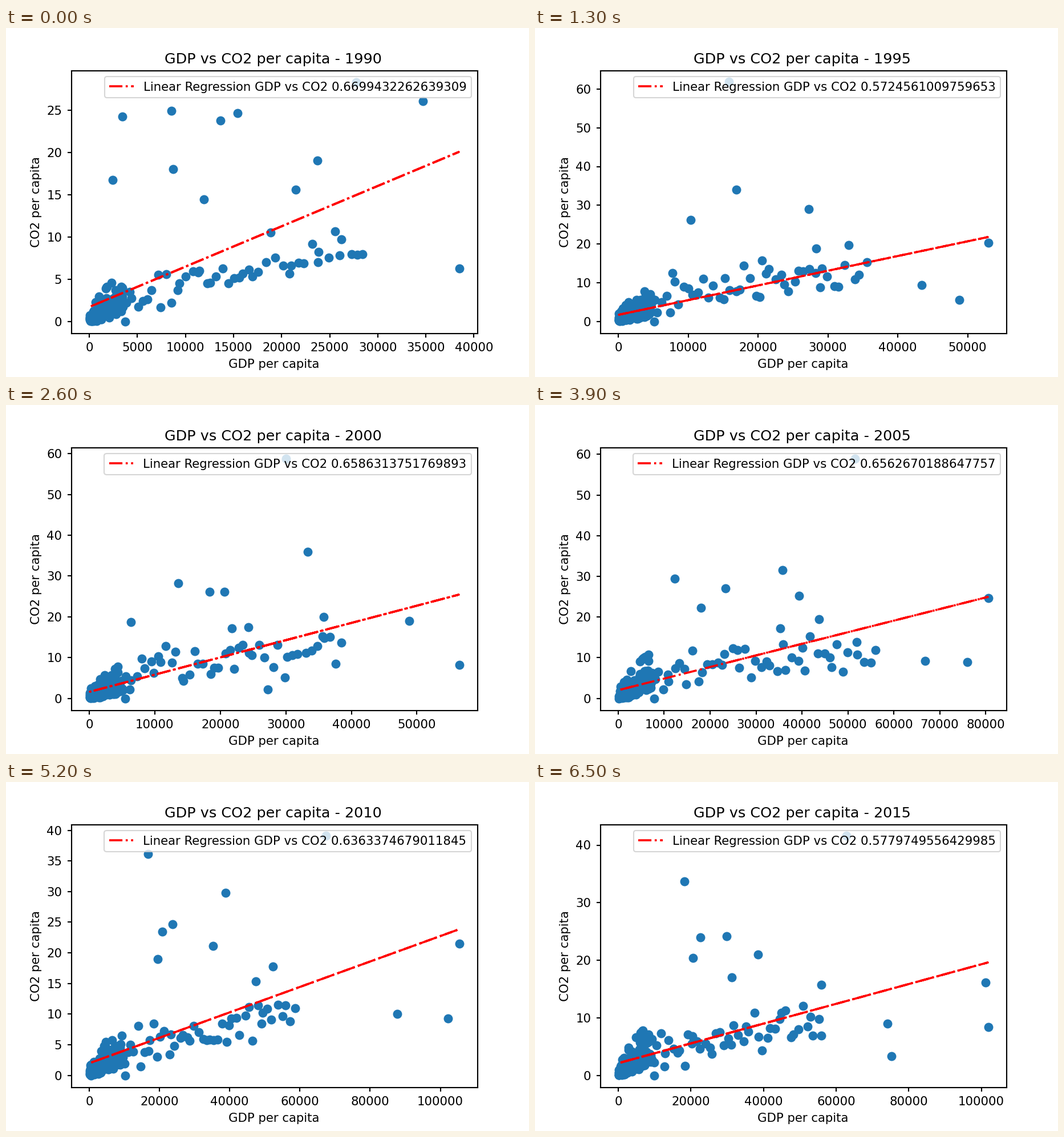
Animation, 917 px wide and 611 px high, one loop 7800 ms. Source, as a matplotlib script:

```python
import numpy as np
import matplotlib.pyplot as plt
from matplotlib.animation import FuncAnimation

W, H, DPI = 917, 611, 917 / 6
LEFT, RIGHT, TOP, BOTTOM = 115.5, 826.5, 74.5, 535
ZERO_X, ZERO_Y = 146, 513.5
FIT_X = (147, 794)
BLUE = "#1f77b4"

plt.rcParams.update({
    "font.family": "DejaVu Sans", "font.size": 10, "axes.linewidth": 1.0,
    "xtick.major.width": 1.0, "ytick.major.width": 1.0,
    "ytick.major.pad": 4.6, "lines.linewidth": 1.7,
})

# Per chart: r is the score, x and y give (tick step, tick gap in pixels),
# fit the line's end heights, crowd the height of the dense wedge,
# band the (length, rise) of the middle field, far the lone countries.
CHARTS = {
    1990: dict(r="0.6699432262639309", x=(5000, 84.3), y=(5, 73.8),
               fit=(488, 217), crowd=46, band=(420, 95),
               far=[(614, 95), (731, 128), (290, 145), (376, 162),
                    (406, 149), (204, 155), (293, 247), (187, 266),
                    (347, 300), (508, 283), (546, 232), (795, 421)]),
    1995: dict(r="0.5724561009759653", x=(10000, 122.5), y=(10, 67.75),
               fit=(502, 366), crowd=30, band=(375, 55),
               far=[(340, 94), (353, 283), (480, 317), (273, 336),
                    (493, 386), (398, 407), (241, 429), (678, 450),
                    (744, 476), (795, 376)]),
    2000: dict(r="0.6586313751769893", x=(10000, 114.9), y=(10, 71.4),
               fit=(502, 332), crowd=30, band=(385, 55),
               far=[(491, 94), (529, 257), (302, 312), (357, 327),
                    (383, 327), (219, 380), (396, 391), (425, 389),
                    (557, 371), (707, 378), (795, 455)]),
    2005: dict(r="0.6562670188647757", x=(10000, 80.5), y=(10, 71.17),
               fit=(499, 336), crowd=44, band=(395, 45),
               far=[(561, 94), (434, 289), (245, 304), (334, 321),
                    (463, 334), (291, 355), (430, 391), (498, 375),
                    (684, 448), (758, 450), (795, 338)]),
    2010: dict(r="0.6363374679011845", x=(20000, 123.1), y=(5, 53.6),
               fit=(492, 258), crowd=54, band=(300, 75),
               far=[(561, 94), (249, 126), (385, 194), (292, 249),
                    (274, 262), (363, 287), (266, 310), (468, 323),
                    (438, 349), (686, 406), (775, 414), (795, 283)]),
    2015: dict(r="0.5779749556429985", x=(20000, 127.3), y=(10, 100.75),
               fit=(492, 316), crowd=52, band=(300, 60),
               far=[(546, 94), (262, 174), (290, 272), (336, 270),
                    (277, 308), (391, 302), (345, 342), (502, 355),
                    (618, 423), (625, 480), (790, 351), (795, 429)]),
}


def crowd(rng, height, n=140):
    """Dense wedge of poor countries rising from the origin."""
    u = rng.random(n) ** 1.3
    low = 514 - 0.4 * height * u ** 2
    high = 507 - height * u ** 0.8
    lift = np.minimum(rng.gamma(1.7, 0.38, n), 1.9)
    return 147 + 58 * u, low + (high - low) * lift


def band(rng, length, rise, n=46):
    """Loose field of richer countries, climbing slowly to the right."""
    u = (np.arange(n) + rng.random(n)) / n
    y = 475 - rise * u + rng.normal(0, 19, n)
    return 207 + length * u ** 1.1, np.clip(y, 340, 498)


def draw(i):
    year, c = list(CHARTS.items())[i]
    rng = np.random.default_rng(year)
    far = np.transpose(c["far"] + [(209, 514)])
    x, y = np.hstack([far, band(rng, *c["band"]), crowd(rng, c["crowd"])])

    ax.clear()
    ax.scatter(x, y, s=36, linewidth=1.5, color=BLUE)

    # The fit runs through the countries in no order, so its dashes overlap.
    run = rng.permutation(np.clip(x, *FIT_X))
    ax.plot(run, np.interp(run, FIT_X, c["fit"]), "r-.",
            label="Linear Regression GDP vs CO2 " + c["r"])

    (xstep, xgap), (ystep, ygap) = c["x"], c["y"]
    xt = np.arange(ZERO_X, RIGHT, xgap)
    yt = np.arange(ZERO_Y, TOP, -ygap)
    ax.set_xticks(xt, [str(k * xstep) for k in range(len(xt))])
    ax.set_yticks(yt, [str(k * ystep) for k in range(len(yt))])
    ax.set_xlim(LEFT, RIGHT)
    ax.set_ylim(BOTTOM, TOP)
    ax.set_title(f"GDP vs CO2 per capita - {year}", x=0.497)
    ax.set_xlabel("GDP per capita", labelpad=4.4, x=0.498)
    ax.set_ylabel("CO2 per capita")
    ax.legend(loc="upper right")


fig = plt.figure(figsize=(W / DPI, H / DPI), dpi=DPI, facecolor="white")
ax = fig.add_axes([LEFT / W, 1 - BOTTOM / H, (RIGHT - LEFT) / W, (BOTTOM - TOP) / H])

anim = FuncAnimation(fig, draw, frames=len(CHARTS), interval=1300,
                     init_func=lambda: draw(0), repeat=True, repeat_delay=0)
plt.show()
```
